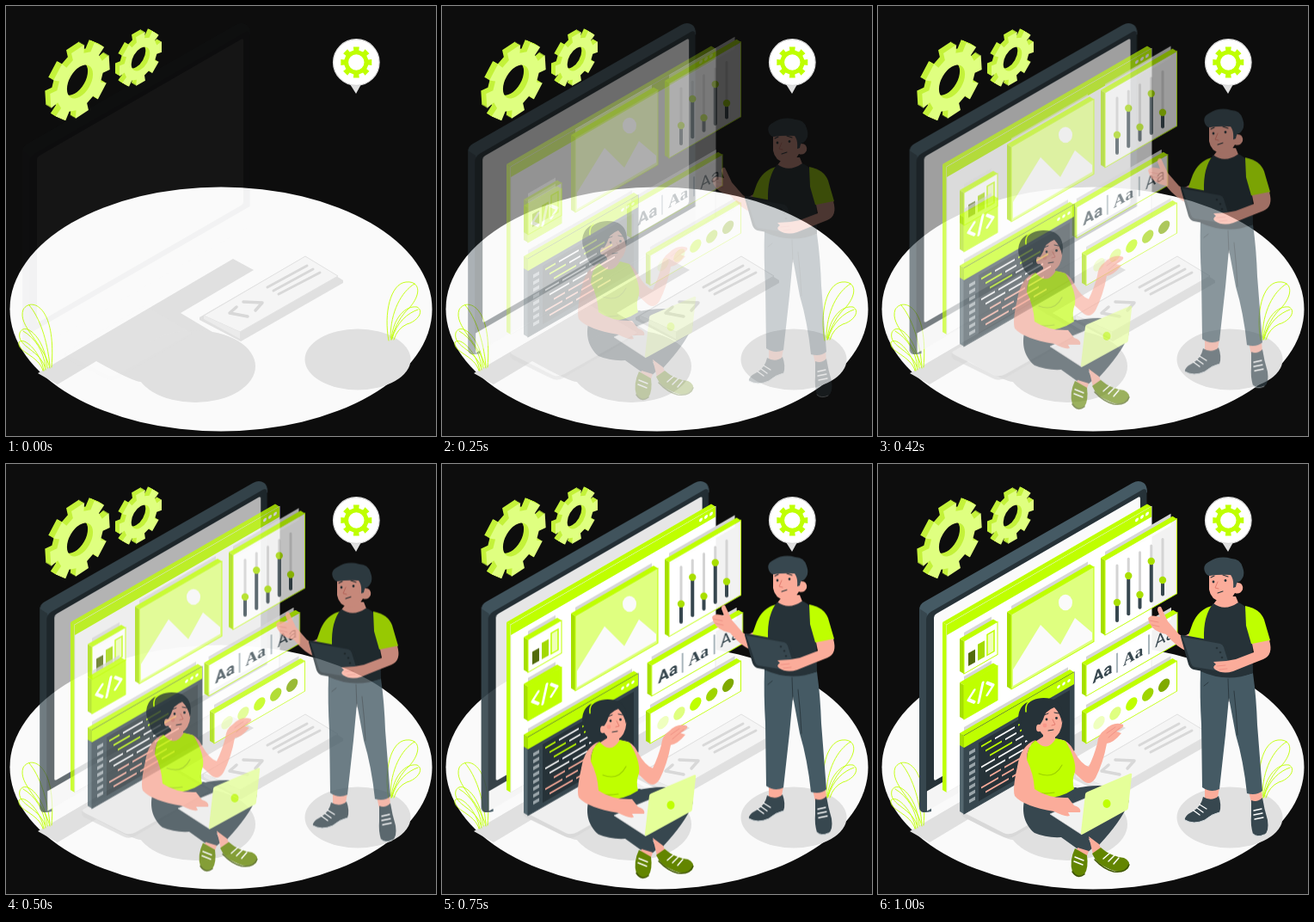
Recreate the animation shown at these times as an HTML page. Size 500 px wide and 500 px high, loop 1040 ms.

```html
<!DOCTYPE html>
<html lang="en">
<head>
<meta charset="utf-8">
<title>Team building an interface</title>
<style>
  html, body { margin: 0; width: 100%; height: 100%; overflow: hidden; background: #0d0d0d; }
  svg { display: block; width: 100%; height: 100%; }

  .slide, .fade, .down, .up, .right {
    animation: 1040ms infinite both;
    animation-timing-function: cubic-bezier(.352, .042, .499, 1.373);
  }
  .slide { animation-name: slide; animation-timing-function: cubic-bezier(.108, .18, .619, 1); }
  .fade { animation-name: fade; }
  .down { animation-name: down; }
  .up { animation-name: up; }
  .right { animation-name: right; }

  @keyframes slide {
    0% { opacity: .034; transform: translateX(-29px); }
    94.2%, 100% { opacity: 1; transform: none; }
  }
  @keyframes fade { 0% { opacity: 0; } 94.2%, 100% { opacity: 1; } }
  @keyframes down {
    0% { opacity: 0; transform: translateY(-30px); }
    94.2%, 100% { opacity: 1; transform: translateY(0); }
  }
  @keyframes up {
    0% { opacity: 0; transform: translateY(30px); }
    94.2%, 100% { opacity: 1; transform: translateY(0); }
  }
  @keyframes right {
    0% { opacity: 0; transform: translateX(-30px); }
    94.2%, 100% { opacity: 1; transform: translateX(0); }
  }

  .lime { fill: #bfff00; }
  .pale { fill: #e5ff99; }
  .ink { fill: #263238; }
  .slate { fill: #37474f; }
  .steel { fill: #455a64; }
  .skin { fill: #fbac9a; }
  .olive { fill: #638500; }
  .grey { fill: #e0e0e0; }
  .line { fill: none; stroke-linecap: round; stroke-linejoin: round; }
  .sans { font: 700 19px Roboto, "Liberation Sans", sans-serif; }
  .serif { font: 700 19px "Liberation Serif", "Noto Serif", serif; }
  .thin { font: 400 19px Roboto, "Liberation Sans", sans-serif; }
</style>
</head>
<body>
<svg id="stage" viewBox="0 0 500 500"></svg>
<script>
const SLOPE = Math.tan(Math.PI / 6);
const LIME = '#bfff00', SIDE = '#a6df00', INK = '#263238';

const path = (d, cls, more = '') => `<path d="${d}" class="${cls}" ${more}/>`;
const line = (d, color, width = 1) =>
  `<path d="${d}" class="line" stroke="${color}" stroke-width="${width}"/>`;
const dot = (x, y, r, fill) => `<circle cx="${x}" cy="${y}" r="${r}" fill="${fill}"/>`;
const oval = (x, y, rx, ry, fill) =>
  `<ellipse cx="${x}" cy="${y}" rx="${rx}" ry="${ry}" fill="${fill}"/>`;
const rect = (x, y, w, h, fill, more = '') =>
  `<rect x="${x}" y="${y}" width="${w}" height="${h}" fill="${fill}" ${more}/>`;
const group = (cls, ...parts) => `<g class="${cls}">${parts.join('')}</g>`;
const at = (x, y, body) => `<g transform="translate(${x} ${y})">${body}</g>`;
const skew = (x, y, body) => at(x, y, `<g transform="skewY(-30)">${body}</g>`);

// Isometric slab: (x, y) is the top left corner of the front face.
function panel(x, y, w, h, body, { fill = '#fff', edge = LIME, side = SIDE, alpha = .95, shadow = true } = {}) {
  const rise = w * SLOPE;
  return (shadow ? skew(x, y, rect(0, -10, w - 7, 14, '#d6d6d6')) : '') + at(x, y,
    `<path d="M-5 -3L0 0V${h}L-5 ${h - 3}Z" fill="${side}"/>` +
    `<path d="M-5 -3L${w - 5} ${-rise - 3}L${w} ${-rise}L0 0Z" class="lime"/>`) +
    skew(x, y, rect(0, 0, w, h, fill, `fill-opacity="${alpha}" stroke="${edge}" stroke-width="1"`) + body);
}

function gearPath(R, root, hole, half, turn = 0) {
  const pts = [];
  for (let i = 0; i < 8; i++) {
    for (const [r, deg] of [[root, -half - 1], [R, -half], [R, half], [root, half + 1]]) {
      const a = (i * 45 + deg + turn) * Math.PI / 180;
      pts.push((r * Math.cos(a)).toFixed(2) + ' ' + (r * Math.sin(a)).toFixed(2));
    }
  }
  return `M${pts.join('L')}ZM${-hole} 0a${hole} ${hole} 0 1 0 ${2 * hole} 0a${hole} ${hole} 0 1 0 ${-2 * hole} 0Z`;
}

function isoGear(x, y, R, depth, turn) {
  const d = gearPath(R, R * .77, R * .43, 12.5, turn);
  let out = '';
  for (let i = depth; i >= 0; i--) {
    const fill = i ? '#c4f23a' : '#dfff80';
    out += `<path d="${d}" fill="${fill}" fill-rule="evenodd" transform="matrix(.866 -.5 0 1 ${x - i} ${y - i * .6})"/>`;
  }
  return out;
}

function floor() {
  const leaf = d => line(d, LIME, .9);
  return oval(250, 352.5, 245.5, 142, '#fafafa') +
    path('M37 427L264 294L288 307L203 357L245 382L157 437Q148 437 105 413L60 440Z', 'grey') +
    oval(220, 419, 70, 42, '#e0e0e0') + oval(409, 411, 61.5, 35.5, '#e0e0e0') +
    // left plant
    leaf('M51 421C44 392 13 372 20 353C28 339 59 346 53 420') +
    leaf('M51 418C48 388 39 362 27 348') +
    leaf('M46 423C42 400 12 397 16 380C22 366 46 386 48 421') +
    leaf('M46 420C44 402 34 386 20 378') +
    leaf('M43 424C38 406 13 403 15 391C21 384 40 402 44 424') +
    // right plant
    leaf('M445 389C439 357 447 323 465 321C483 319 484 338 464 356Q453 369 448 388') +
    leaf('M447 386C447 355 460 332 475 323') +
    leaf('M448 388C450 362 465 348 478 350C487 355 478 367 466 370Q455 375 451 388') +
    leaf('M449 387C454 368 467 357 479 353') +
    // floor tablet
    path('M225 362L348 291L392 319L392 322L273 390L225 365Z', '', 'fill="#e0e0e0"') +
    path('M230 360L348 291L386 314L272 379Z', '', 'fill="#f5f5f5" stroke="#e2e2e2"') +
    path('M230 360L272 379V387L230 364Z', '', 'fill="#ebebeb"') +
    line('M268 350L260 357L281 361M276 344L298 345L290 354', '#d8d8d8', 3.5) +
    line('M304 327L350 302M311 331L357 306M317 335L365 310', '#d8d8d8', 3);
}

function monitor() {
  return group('slide',
    // foot
    path('M97 404L190 350L245 382L160 432Q152 437 145 433L100 411Q96 408 97 404Z', '', 'fill="#d8d8d8"') +
    path('M98 402L190 348L245 380L160 428Q152 432 146 429L101 406Q97 404 98 402Z', '', 'fill="#f0f0f0"'),
    path('M48 170Q48 163 54 160L296 22Q303 18 309 22Q313 25 313 33L62 200V404Q48 408 48 397Z', 'steel'),
    path('M48 168L57 174V404Q48 408 48 397Z', 'slate'),
    skew(56, 175,
      rect(1, 205, 255, 24, '#f5f5f5') +
      path('M0 206V7Q0 0 6 0H250Q256.500 0 256.500 7V206Z', 'ink') +
      rect(9, 6, 240, 193, '#fafafa', 'rx="3"')));
}

function browser() {
  const lights = [221, 227, 233].map(x => dot(x, 5.5, 2, '#fff')).join('');
  return group('fade', panel(80, 187, 238, 195, rect(0, 0, 238, 12, LIME) + lights,
    { edge: '#eee', alpha: 1, shadow: false, side: LIME }));
}

function sliders() {
  const knobs = [161, 130, 152, 113, 135];
  const tracks = knobs.map((k, i) => {
    const x = 278 + i * 13.25, top = 118 - i * 7.65, end = top + 64;
    return line(`M${x} ${top}V${end}`, '#d4d4d4', 3) +
      line(`M${x} ${k}V${end}`, '#37474f', 4) + dot(x, k, 4.2, '#a9df00');
  }).join('');
  return group('down', panel(264, 112, 83.5, 87, '') + tracks);
}

function picture() {
  return group('down', panel(155, 175, 96, 87, '', { fill: '#dfff80', alpha: 1 }),
    path('M157 239L189 187L212 210L229 179L249 196V204L157 258Z', '', 'fill="#fafafa"'),
    oval(218, 161, 8, 9.3, '#fafafa'));
}

function icons() {
  const bars = rect(5, 17, 8, 15, '#526b0c') + rect(16, 13, 8, 19, '#a3da00') +
    rect(27, 8, 8, 24, '#efffb8', `stroke="${LIME}" stroke-width="1.5"`);
  const code = line('M12 13L5 20L12 27M27 13L34 20L27 27M22 10L17 30', '#fff', 3.2);
  return group('up', panel(100, 206, 39, 38, bars)) +
    group('down', panel(100, 257, 39, 40, code, { fill: LIME, alpha: 1 }));
}

function letters() {
  const word = (cls, x) => `<text class="${cls}" x="${x}" y="26" fill="#37474f">Aa</text>`;
  return group('right', panel(242, 234, 106, 36,
    word('sans', 7.5) + word('serif', 43) + word('thin', 80) +
    line('M36 7V29M73 7V29', '#546e7a', 1)));
}

function swatches() {
  const tones = ['#efffbf', '#dfff80', '#bfff00', '#9fd500', '#7fa900'];
  return group('fade', panel(242, 290, 105.5, 35,
    tones.map((c, i) => dot(15 + i * 18.9, 19.5, 6.7, c)).join('')));
}

function editor() {
  let body = rect(0, 0, 128, 14, LIME) + rect(17, 18, 106, 68, INK) +
    [110, 116, 122].map(x => dot(x, 6.5, 1.8, '#fff')).join('');
  for (let r = 0; r < 8; r++) {
    const y = 23 + r * 8;
    const tone = r < 3 ? LIME : r < 5 ? '#fafafa' : '#fbac9a';
    body += rect(6, y - 1, 7, 4, '#9aa5aa');
    let x = 20 + (r % 3) * 5;
    for (let i = 0; i < 3; i++) {
      const w = 12 + (r * 7 + i * 11) % 17;
      body += rect(x, y, w, 2, i === 1 && r < 4 ? '#fafafa' : tone);
      x += w + 4;
    }
  }
  return group('down', panel(100, 316, 128, 91, body,
    { fill: '#37474f', edge: '#37474f', side: '#54676f', alpha: 1 }),
    path('M95 313L100 316V330L95 327Z', '', `fill="${SIDE}"`));
}

function woman() {
  return group('down',
    // hair behind, legs
    path('M174 277C162 282 160 300 168 308Q168 321 180 326L194 322L200 285Z', 'ink'),
    path('M172 384C166 402 169 418 182 429Q196 435 213 434L241 454L250 446L242 430L275 400L230 376Z', 'slate'),
    path('M225 378Q260 370 280 378Q296 385 290 397Q282 416 257 443L240 433L236 410Z', 'slate'),
    path('M232 446L245 450L242 459L229 456ZM245 433L257 442L260 449L250 454Z', 'skin'),
    path('M229 447L243 455Q245 470 240 477Q232 483 226 474Q222 462 229 447Z', 'olive'),
    path('M249 453L259 446Q270 456 286 458Q295 462 291 470Q283 478 267 470Q254 465 249 453Z', 'olive'),
    line('M229 457L239 461M228 462L238 466M262 459L270 452M268 462L275 455M274 465L280 458', '#fff', 1.5),
    line('M226 474Q232 483 240 477M252 460Q262 471 274 474Q288 476 292 466', '#3e5500', 1.5),
    // raised arm
    path('M211 320Q222 321 228 334Q236 349 245 352Q251 340 255 325Q256 314 264 309Q274 299 285 303Q287 306 277 311L283 313Q274 324 266 325Q262 347 253 365Q246 376 237 367Q221 353 214 342Z', 'skin'),
    line('M266 313L276 306M268 318L281 307', '#ee8c80', .8),
    // torso
    path('M178 326L192 317V308H206V319L211 321L199 337Z', 'skin'),
    path('M183 321Q196 337 207 319L218 322Q231 344 229 358Q225 368 228 378Q204 394 172 386Q176 360 173 344Q173 328 183 321Z', 'lime'),
    line('M187 360Q205 367 214 350M175 380Q190 385 205 382', '#9bd000', 1.1),
    // head
    path('M187 286Q200 276 212 284Q217 301 211 312Q205 322 197 318Q186 314 186 298Z', 'skin'),
    path('M171 283C176 273 190 270 201 273C213 276 217 287 214 301Q212 290 205 283Q194 287 192 297Q189 303 187 304Q182 301 183 310Q188 321 178 324C164 319 164 296 171 283Z', 'ink'),
    oval(187, 307, 3, 4.3, '#fbac9a'),
    line('M176 276Q171 280 172 288', LIME, 1.6),
    dot(196, 297, 1.4, INK), dot(207.5, 295.5, 1.4, INK),
    line('M193 292L198 290M205 289L210 290M198 310L204 309', INK, 1),
    line('M203 297L206 303L202 304', '#e37d70', 1),
    dot(194, 304, 2.4, '#f9988a'),
    // laptop and arm
    path('M200 407L226 395L243 388L237 431Z', '', 'fill="#f2f2f2" stroke="#d4d4d4" stroke-width=".7"'),
    path('M183 321Q166 327 162 352Q156 378 159 386Q169 398 205 404Q218 411 223 409L221 405L235 405Q237 400 228 397L221 388Q198 389 182 378Q181 360 173 344Q173 328 183 321Z', 'skin'),
    path('M241 384Q241 382 244 381L293 360Q296 359 295 363L291 399Q291 402 288 403L239 430Q235 432 236 428Z', 'pale'),
    oval(266, 395, 4.5, 5, LIME));
}

function man() {
  return group('up',
    // legs
    path('M380 376H397L394 393L380 390ZM431 380L446 378L447 394L434 394Z', 'skin'),
    path('M375 240Q402 253 436 243Q440 272 441 303L447 380Q440 386 429 383Q425 345 416 315L408 272L404 315L397 378Q387 383 377 376L376 303Q374 270 375 240Z', 'steel'),
    line('M407 250L408 276M414 264Q417 290 418 315M384 254L379 258', '#263238', .8),
    path('M378 387Q388 393 396 386Q400 397 397 405Q388 407 380 414Q367 420 357 414Q356 409 366 404Q376 398 378 387Z', 'slate'),
    path('M434 391Q441 394 447 388Q449 401 453 414Q455 428 449 431Q441 435 436 430Q433 420 434 409Z', 'slate'),
    line('M357 414Q367 420 380 414Q388 407 397 405M436 430Q441 435 449 431', '#cfd6d9', 1),
    line('M374 396L382 401M371 400L378 405M367 403L374 408M437 403L446 401M437 408L447 406M438 413L448 411', '#fff', 1.3),
    // pointing arm
    path('M362 197Q355 202 350 198L337 183L329 166Q325 165 325 170L328 178Q316 174 314 180Q316 191 328 196L335 198Q347 213 360 218L377 207L374 196Z', 'skin'),
    line('M316 182L326 184M318 187L327 189', '#ee8c80', .8),
    path('M388 165Q373 169 366 185L361 199Q367 207 378 208L386 190Z', 'lime'),
    // torso
    path('M390 163L397 154H416L420 164Q405 177 390 163Z', 'skin'),
    path('M390 162Q403 172 419 161Q432 166 435 183L436 243Q406 255 375 241L379 204Q378 176 390 162Z', 'ink'),
    path('M427 165Q444 168 449 181L456 205Q446 212 434 209L428 188Z', 'lime'),
    // head
    path('M385 128Q391 121 414 126L418 138Q425 138 424 146Q421 152 415 150Q410 160 399 160Q387 158 385 146Z', 'skin'),
    path('M380 125Q377 117 386 113Q397 106 411 110Q421 110 424 120Q428 131 420 137Q417 136 416 143L413 144Q414 134 410 129Q396 128 386 130Q382 130 380 125Z', 'slate'),
    dot(390, 137, 1.4, INK), dot(404, 135.5, 1.4, INK),
    line('M387 132L391 130M401 129L407 131M395 150L401 148', INK, 1.1),
    line('M395 137L392 144L396 145', '#e37d70', 1),
    // tablet and holding arm
    path('M352 201Q351 198 356 199L399 207Q403 208 405 212L414 238Q415 247 405 246L367 239Q363 238 361 233Z', 'ink'),
    path('M354 201L398 209Q401 210 402 213L410 239Q410 243 405 242L368 236Q365 235 364 232Z', 'slate'),
    dot(394, 214, 1.3, INK), dot(398, 219, 1.3, INK), dot(400, 225, 1.3, INK),
    path('M435 209L455 205Q460 222 448 227Q430 234 413 241Q401 245 392 239Q388 236 393 233L390 230L405 229L416 227L437 219Z', 'skin'),
    line('M394 235L404 234M397 239L406 238', '#ee8c80', .8));
}

function pin() {
  return path('M400 91L407 102L413 91Z', 'grey') +
    `<circle cx="407.3" cy="65.5" r="26.8" fill="#fff" stroke="#d8d8d8" stroke-width="1.2"/>` +
    at(407.3, 65.5, path(gearPath(18.3, 14.3, 9.2, 11), 'lime', 'fill-rule="evenodd"'));
}

document.getElementById('stage').innerHTML = [
  floor(), monitor(), browser(), sliders(), picture(), icons(), letters(), swatches(),
  editor(), woman(), man(), isoGear(86, 88, 40.5, 6, -4), isoGear(156.5, 61.5, 29, 5, 0), pin()
].join('');
</script>
</body>
</html>
```
